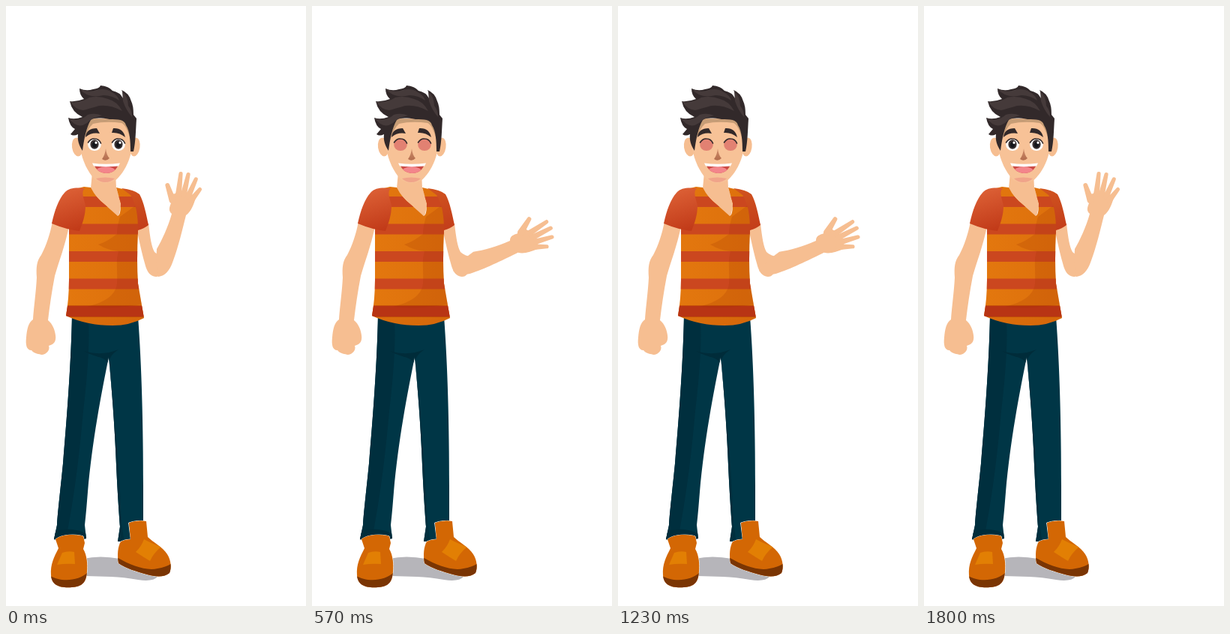
These frames come from a looping animation (400x800 px, 1.97 s). An HTML page with a canvas:

```html
<!DOCTYPE html>
<html lang="en">
<head>
<meta charset="utf-8">
<title>Waving man</title>
<style>
html, body { margin: 0; width: 100%; height: 100%; overflow: hidden; background: #fff; }
canvas { display: block; width: 400px; height: 800px; }
</style>
</head>
<body>
<canvas id="stage"></canvas>
<script>
const LOOP = 1970, STEP = 30, PEAK = 900, SWING = 79;
const ELBOW = { x: 204, y: 341 };
const SKIN = '#f6be91', HAIR = '#32292a', SHEEN = '#453a3a', SHOE = '#d36704';

const canvas = document.getElementById('stage');
const ctx = canvas.getContext('2d');
const dpr = window.devicePixelRatio || 1;
canvas.width = 400 * dpr;
canvas.height = 800 * dpr;

function fill(d, color) {
  ctx.fillStyle = color;
  ctx.fill(new Path2D(d));
}

function line(d, color, width) {
  ctx.strokeStyle = color;
  ctx.lineWidth = width;
  ctx.lineCap = ctx.lineJoin = 'round';
  ctx.stroke(new Path2D(d));
}

function oval(x, y, rx, ry, color, turn = 0) {
  ctx.fillStyle = color;
  ctx.beginPath();
  ctx.ellipse(x, y, rx, ry, turn, 0, Math.PI * 2);
  ctx.fill();
}

function fade(x0, y0, x1, y1, from, to) {
  const g = ctx.createLinearGradient(x0, y0, x1, y1);
  g.addColorStop(0, from);
  g.addColorStop(1, to);
  return g;
}

function clipped(d, draw) {
  ctx.save();
  ctx.clip(new Path2D(d));
  draw();
  ctx.restore();
}

// A finger narrows from its base to a round tip.
function finger(x0, y0, x1, y1, r0, r1) {
  const a = Math.atan2(y1 - y0, x1 - x0), h = Math.PI / 2;
  ctx.beginPath();
  ctx.arc(x0, y0, r0, a + h, a - h);
  ctx.arc(x1, y1, r1, a - h, a + h);
  ctx.closePath();
  ctx.fill();
}

function drawLegs() {
  const legs = 'M88 412C87 470 82 540 76 610C72 650 69 675 68 692L64 711L80 716L107 710' +
    'L105 692C107 675 108 660 109 648C115 580 127 517 137 468C141 510 145 560 147 612' +
    'C149 655 151 680 152 694L149 714L183 712L183 640C183 560 181 480 176 414Z';
  fill('M103 737Q125 732 152 737L202 761Q196 768 176 765C150 760 130 761 106 760Z', '#b6b5ba');
  fill(legs, '#003646');
  clipped(legs, () => {
    fill('M84 412L110 421C112 450 108 500 103 540C98 600 90 660 82 700L79 718L58 718Z', '#002f3e');
    fill('M104 460C122 465 134 464 150 458C143 463 140 466 138 472L136 476C131 467 116 468 104 460Z', '#002c3a');
    fill('M137 466C143 530 151 600 154 690L158 716L148 716L138 520Z', '#002f3e');
    fill('M60 702Q85 692 108 704L108 720L60 720Z', '#002c3a');
  });
}

function drawShoes() {
  const left = 'M66 711C74 704 94 704 103 707L105 716L103 724C108 732 109 745 108 754' +
    'C107 765 105 774 88 775C72 776 61 773 60 759C59 744 64 735 70 723Z';
  const right = 'M164 689Q175 685 187 687L189 708C196 715 209 721 215 731' +
    'C220 739 221 749 218 756C211 762 199 761 188 758C174 754 160 750 150 743' +
    'C148 732 149 721 153 714Q159 711 166 711Z';
  line(left, '#fff', 1);
  fill(left, SHOE);
  clipped(left, () => {
    fill('M58 759C70 768 98 768 110 754L110 780L58 780Z', '#7a3503');
    fill('M75 729Q83 726 91 728L92 744Q79 743 68 745Z', '#e27f04');
  });
  line(right, '#fff', 1);
  fill(right, SHOE);
  clipped(right, () => {
    fill('M146 734C164 745 187 754 202 750Q214 748 221 743L224 766L146 766Z', '#7a3503');
    fill('M173 728Q181 720 184 711Q197 718 207 721Q197 729 192 740Q182 734 173 728Z', '#e27f04');
  });
}

function drawLeftArm() {
  fill('M62 287C59 304 53 321 47 332C41 340 40 348 41 362C40 382 37 402 36 418' +
    'C30 422 28 430 27 442C26 451 27 459 34 459C38 464 44 464 48 465C55 464 59 458 57 453' +
    'C65 451 67 446 66 439C65 431 62 424 56 419C58 401 61 381 65 360C70 342 79 319 84 294Z', SKIN);
}

function drawWavingArm(degrees) {
  fill('M173 292L190 290C192 308 194 321 198 328Q203 333 214 335L209 352Q207 361 200 361' +
    'C192 360 188 355 185 343C180 325 177 310 173 292Z', SKIN);
  ctx.save();
  ctx.translate(ELBOW.x, ELBOW.y);
  ctx.rotate(degrees * Math.PI / 180);
  ctx.translate(-ELBOW.x, -ELBOW.y);
  fill('M201 324C208 312 216 295 221 277C216 273 218 268 220 263Q219 258 217 253L222 250' +
    'Q226 252 228 246L246 249L253 256C250 265 247 274 240 279C236 295 229 325 222 342' +
    'C218 353 212 360 203 361L200 341Z', SKIN);
  finger(222, 259, 215.3, 239, 4.5, 2.9);
  finger(230, 251, 233, 223.6, 4, 2.6);
  finger(237, 251, 243, 224.6, 4, 2.6);
  finger(243, 254, 253.2, 231, 4, 2.6);
  finger(247, 259, 258.6, 244.4, 4, 2.5);
  ctx.restore();
}

function drawShirt() {
  const body = 'M84 246L104 241L113 242Q120 256 132 265L149 280Q153 279 153 263L147 242L172 248L178 260L176 300' +
    'Q174 340 176 370L184 416Q165 426 142 426Q108 426 80 413Q84 390 84 365L84 300Z';
  fill('M115 222L113 243Q120 257 132 266L150 281L154 263L147 243L146 222Z', SKIN);
  fill(body, fade(84, 0, 180, 0, '#e3770e', '#dd700c'));
  clipped(body, () => {
    ctx.fillStyle = '#cb471f';
    for (let i = 0; i < 5; i++) ctx.fillRect(70, 254 + i * 36.5, 120, 14);
    fill('M178 262L152 281C149 291 148 298 148 304C140 310 132 315 123 318Q136 326 150 327' +
      'C146 340 149 352 148 370C146 386 132 395 108 401C130 404 160 402 190 396L190 262Z', 'rgba(160,50,0,.2)');
    fill('M78 399L190 399L190 415L78 415Z', 'rgba(150,20,0,.36)');
    fill('M78 414L190 414L190 430L78 430Z', 'rgba(160,50,0,.14)');
  });
  fill('M61 290C65 272 70 258 78 249C84 242 94 242 105 243C100 248 103 254 106 266' +
    'C106 279 102 290 98 300Q80 298 61 290Z', fade(76, 250, 92, 300, '#da5d33', '#c13a18'));
  fill('M154 243Q171 245 178 251C184 262 187 278 190 292Q184 297 176 299' +
    'C176 281 174 264 166 252Z', fade(165, 245, 183, 298, '#d0531f', '#c33d1a'));
}

function drawEye(x, shut) {
  oval(x, 185, 8.8, 8, shut ? '#e28172' : '#fff');
  if (!shut) {
    oval(x, 184.5, 5.6, 6.2, '#3a3233');
    oval(x, 185, 3.2, 3.8, '#14161b');
    oval(x + 2, 182.3, 1.5, 1.7, '#fff');
  }
  line(`M${x - 8.5} 182Q${x - 5} 176.5 ${x} 177Q${x + 6} 177 ${x + 8.5} 183`, HAIR, 1.6);
}

function drawMouth() {
  const lips = 'M117 211L150 211Q146 223 133 223Q121 222 117 211Z';
  fill(lips, '#cc4a44');
  clipped(lips, () => oval(133, 221, 13, 7, '#f3858b'));
  fill('M115 209.5Q133 212 152 209.5L150 213.5Q133 215 117 213.5Z', '#fff');
}

function drawHead(shut) {
  oval(95, 188, 7, 12.5, SKIN, -0.15);
  oval(172, 188, 6.5, 12.5, SKIN, 0.15);
  fill('M98 150L170 150C171 174 169 191 164 205C159 218 152 228 145 233Q131 240 118 231' +
    'C109 221 102 207 99 190Z', '#f7c297');
  fill('M120 230Q132 227 145 230Q140 235 132 235Q125 235 120 230Z', '#f0a48a');

  fill('M105 178Q108 157 113 150L158 151Q163 160 166 178Q160 158 154 156Q133 153 116 157Q109 163 105 178Z', '#c79d76');
  fill('M102 193C97 186 95 178 96 171Q90 174 86 171L92 164Q85 161 83 149Q91 152 102 148' +
    'Q88 142 85 127Q94 128 104 124Q98 119 98 110Q107 114 116 111Q125 110 126 106Q137 107 142 113' +
    'Q152 115 156 123Q157 117 154 112Q164 116 167 127Q170 133 170 145L174 150' +
    'C173 165 173 181 170 194L166 194C166 180 165 166 160 159C158 151 150 151 138 151' +
    'C126 149 117 149 113 152C107 162 104 178 102 193Z', HAIR);
  fill('M86 128Q101 129 111 122Q124 119 136 124Q148 127 155 140Q139 131 124 133Q110 137 103 139Q92 138 86 128Z', SHEEN);
  fill('M99 111Q111 116 121 112Q133 109 141 115Q149 119 151 126Q141 119 130 119Q109 124 99 111Z', SHEEN);
  fill('M84 150Q98 155 109 145Q118 142 128 146Q114 149 108 156Q95 165 84 150Z', SHEEN);
  fill('M155 114Q163 121 163 133Q168 139 168 148Q160 139 156 127Z', SHEEN);

  fill('M106 175Q107 163 121 163L125 170Q114 168 106 175Z', HAIR);
  fill('M141 169L143 163Q156 162 159 175Q151 168 141 169Z', HAIR);
  drawEye(118, shut);
  drawEye(150, shut);
  fill('M133 190Q134 199 138 203Q133 208 128 204Q132 199 133 190Z', fade(133, 190, 133, 207, '#d08f6c', '#b0694a'));
  drawMouth();
}

function draw(t) {
  const now = Math.min(2 * PEAK, Math.floor(t / STEP) * STEP);
  const away = Math.abs(now - PEAK);
  const shut = away >= 300 && away <= 390;
  ctx.setTransform(dpr, 0, 0, dpr, 0, 0);
  ctx.fillStyle = '#fff';
  ctx.fillRect(0, 0, 400, 800);
  drawLegs();
  drawShoes();
  drawLeftArm();
  drawWavingArm(SWING * (1 - away / PEAK));
  drawShirt();
  drawHead(shut);
}

const start = performance.now();
function tick(now) {
  draw(Math.max(0, now - start) % LOOP);
  requestAnimationFrame(tick);
}
draw(0);
requestAnimationFrame(tick);
</script>
</body>
</html>
```
